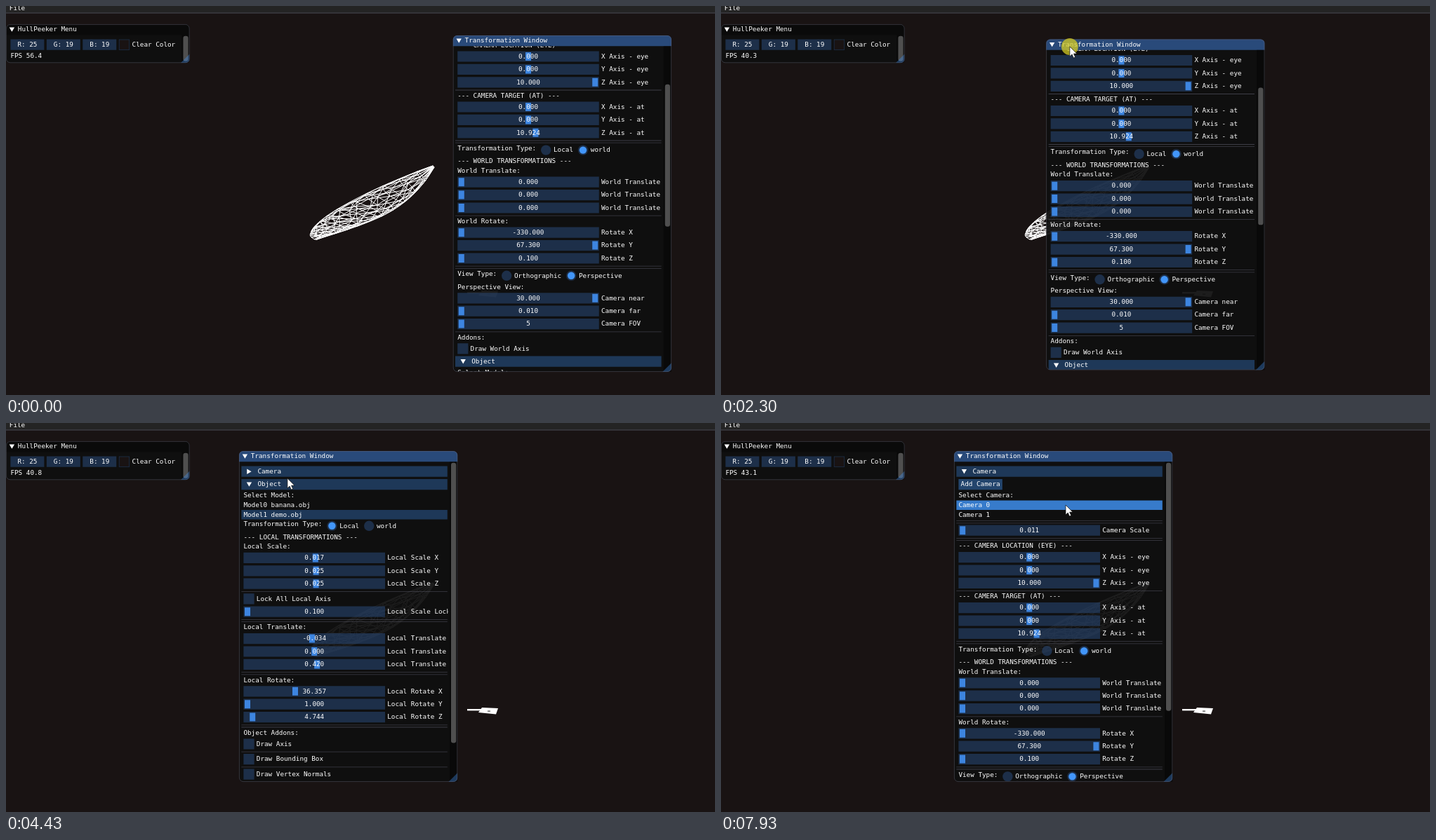
Animation, 1010 px wide and 555 px high, one loop 8000 ms. Source, as an HTML page with a canvas:

```html
<!DOCTYPE html>
<html lang="en">
<head>
<meta charset="utf-8">
<title>Transformation Window</title>
<style>
  html, body { margin: 0; width: 100%; height: 100%; overflow: hidden; background: #191313; }
  canvas { display: block; }
</style>
</head>
<body>
<canvas id="stage" width="1010" height="555"></canvas>
<script>
const ctx = document.getElementById('stage').getContext('2d');
const LOOP = 8000;
const SCALE = 0.8;
const CHAR = 7, FRAME = 19, LINE = 13, GAP = 4, PAD = 8, GRAB = 10;
const WIN_W = 389, SLIDER_W = 252;

const color = {
  frame: 'rgba(41,74,122,.54)',
  frameHover: 'rgba(66,150,250,.4)',
  grab: '#3d85e0',
  accent: '#4296fa',
  header: 'rgba(66,150,250,.31)',
  headerHover: 'rgba(66,150,250,.8)',
  button: 'rgba(66,150,250,.4)',
  line: 'rgba(110,110,128,.5)',
  window: 'rgba(15,15,15,.94)'
};

const RESIZE = [830, 1300], DRAG = [1790, 2560], RELEASE = 3200;
const CAMERA_CLOSE = 4170, OBJECT_CLOSE = 4650, CAMERA_REOPEN = 5980;
const presses = [[880, 1350], [1750, 3150], [4070, CAMERA_CLOSE], [4590, OBJECT_CLOSE],
  [5760, CAMERA_REOPEN]];

// Stops hold a time followed by values.
const mouseStops = [[RELEASE, 379, 51], [3550, 420, 190], [4070, 362, 70], [4220, 362, 70],
  [4430, 401, 79], [4590, 386, 88], [5000, 386, 88], [5300, 402, 158], [5780, 361, 65],
  [6810, 361, 65], [7350, 385, 130], [7930, 491, 117]];
const fpsStops = [[0, 56.4], [920, 47.1], [1950, 41.5], [2770, 38.6], [4430, 40.8],
  [5840, 43.6], [7930, 43.1]];

const mix = (a, b, k) => a + (b - a) * k;
const clamp = k => Math.min(1, Math.max(0, k));
const ramp = (t, [from, to]) => clamp((t - from) / (to - from));
const within = (t, [from, to]) => t >= from && t < to;

function sample(stops, t) {
  const last = stops.length - 1;
  const i = Math.max(0, stops.findLastIndex(stop => stop[0] <= t));
  const a = stops[i], b = stops[Math.min(i + 1, last)];
  const k = i < last ? ramp(t, [a[0], b[0]]) : 0;
  return a.slice(1).map((v, n) => mix(v, b[n + 1], k));
}

function windowRect(t) {
  const resize = ramp(t, RESIZE), drag = ramp(t, DRAG);
  const x = mix(636.8, 341, drag ** 1.3) - 9 * ramp(t, [2770, 3000]);
  const y = 42 + 8.4 * resize - 10 * drag ** 3 - 0.4 * ramp(t, [2770, 3000]);
  return { x, y, h: (480 - 8 * resize) / SCALE };
}

function mouseAt(t) {
  if (t >= RELEASE) return sample(mouseStops, t);
  // The window trails the pointer slightly while it is dragged.
  const { x, y } = windowRect(t + 30);
  const lift = ramp(t, [70, 700]), shift = ramp(t, [1350, 1600]);
  return [x + mix(mix(68, 35, lift), 47, shift), y + mix(mix(330, 4, lift), 11, shift)];
}

function box(x, y, w, h, fill, radius = 0) {
  ctx.fillStyle = fill;
  ctx.beginPath();
  ctx.roundRect(x, y, w, h, radius);
  ctx.fill();
}

function polygon(points, fill) {
  ctx.fillStyle = fill;
  ctx.beginPath();
  points.forEach(([x, y]) => ctx.lineTo(x, y));
  ctx.closePath();
  ctx.fill();
}

function disc(x, y, r, fill) {
  ctx.fillStyle = fill;
  ctx.beginPath();
  ctx.arc(x, y, r, 0, Math.PI * 2);
  ctx.fill();
}

function label(str, x, y) {
  ctx.font = '11.63px "DejaVu Sans Mono", monospace';
  ctx.fillStyle = '#fff';
  ctx.fillText(str, x, y + 10);
}

const centered = (str, cx, y) => label(str, cx - str.length * CHAR / 2, y);

function arrow(x, y, open) {
  const a = 4.6, b = 4;
  polygon(open ? [[x - a, y - b], [x + a, y - b], [x, y + b]]
               : [[x - b, y - a], [x + b, y], [x - b, y + a]], '#fff');
}

function panel(x, y, w, h, title, titleFill, body) {
  ctx.save();
  ctx.translate(x, y);
  ctx.scale(SCALE, SCALE);
  box(0, 0, w, h, color.window, 7);
  box(0, 0, w, FRAME, titleFill, [7, 7, 0, 0]);
  arrow(10.5, 9.5, true);
  label(title, 21, 3);
  body();
  ctx.save();
  ctx.beginPath();
  ctx.roundRect(0, 0, w, h, 7);
  ctx.clip();
  polygon([[w, h - 16], [w, h], [w - 16, h]], 'rgba(66,150,250,.35)');
  ctx.restore();
  ctx.strokeStyle = color.line;
  ctx.lineWidth = 1;
  ctx.beginPath();
  ctx.roundRect(0.5, 0.5, w - 1, h - 1, 7);
  ctx.stroke();
  ctx.restore();
}

// Minimal immediate-mode layout, in unscaled window units.
class Layout {
  constructor(y, right, mouse) {
    Object.assign(this, { y, right, mouse });
  }
  fill(x, y, w, h, normal, hover) {
    const m = this.mouse;
    const hot = m && m.x >= x && m.x < x + w && m.y >= y && m.y < y + h;
    box(x, y, w, h, hot ? hover : normal);
  }
  advance(h) { this.y += h + GAP; }
  text(str) {
    label(str, PAD, this.y);
    this.advance(LINE);
  }
  rule(count = 1) {
    for (; count > 0; count--) {
      box(4, this.y, this.right - 4, 1, color.line);
      this.advance(0);
    }
  }
  header(str, open) {
    this.fill(4, this.y, this.right - 4, FRAME, color.header, color.headerHover);
    arrow(18, this.y + 9.5, open);
    label(str, 33, this.y + 3);
    this.advance(FRAME);
  }
  button(str) {
    this.fill(PAD, this.y, str.length * CHAR + 8, FRAME, color.button, color.accent);
    label(str, PAD + 4, this.y + 3);
    this.advance(FRAME);
  }
  option(str, selected) {
    this.fill(4, this.y - 2, this.right - 4, LINE + GAP,
      selected ? color.header : 'transparent', color.headerHover);
    this.text(str);
  }
  slider(str, value, min, max, digits = 3) {
    const y = this.y;
    const part = ramp(value, [min, max]);
    this.fill(PAD, y, SLIDER_W, FRAME, color.frame, color.frameHover);
    box(PAD + 2 + part * (SLIDER_W - GRAB - 4), y + 2, GRAB, FRAME - 4, color.grab);
    centered(value.toFixed(digits), PAD + SLIDER_W / 2, y + 3);
    label(str, PAD + SLIDER_W + GAP, y + 3);
    this.advance(FRAME);
  }
  sliders(pattern, values, min, max) {
    values.forEach((value, i) => this.slider(pattern.replace('*', 'XYZ'[i]), value, min, max));
  }
  check(str) {
    this.fill(PAD, this.y, FRAME, FRAME, color.frame, color.frameHover);
    label(str, PAD + FRAME + GAP, this.y + 3);
    this.advance(FRAME);
  }
  radios(str, names, active) {
    label(str, PAD, this.y);
    let x = PAD + str.length * CHAR + PAD;
    names.forEach((name, i) => {
      disc(x + 9.5, this.y + 9.5, 9, color.frame);
      if (i === active) disc(x + 9.5, this.y + 9.5, 6.5, color.accent);
      label(name, x + FRAME + GAP, this.y + 3);
      x += FRAME + GAP + name.length * CHAR + PAD;
    });
    this.advance(FRAME);
  }
}

function cameraSection(ui) {
  ui.button('Add Camera');
  ui.text('Select Camera:');
  ui.option('Camera 0');
  ui.option('Camera 1');
  ui.rule(2);
  ui.slider('Camera Scale', 0.011, 0.01, 1);
  ui.rule(2);
  ui.text('--- CAMERA LOCATION (EYE) ---');
  ui.sliders('* Axis - eye', [0, 0, 10], -10, 10);
  ui.rule();
  ui.text('--- CAMERA TARGET (AT) ---');
  ui.sliders('* Axis - at', [0, 0, 10.924], -100, 100);
  ui.rule(2);
  ui.radios('Transformation Type:', ['Local', 'world'], 1);
  ui.text('--- WORLD TRANSFORMATIONS ---');
  ui.text('World Translate:');
  ui.sliders('World Translate *', [0, 0, 0], 0, 1);
  ui.rule();
  ui.text('World Rotate:');
  ui.sliders('Rotate *', [-330, 67.3, 0.1], 1, 10);
  ui.rule(2);
  ui.radios('View Type:', ['Orthographic', 'Perspective'], 1);
  ui.text('Perspective View:');
  ui.slider('Camera near', 30, 0, 30);
  ui.slider('Camera far', 0.01, 0.01, 30);
  ui.slider('Camera FOV', 5, 5, 90, 0);
  ui.rule();
  ui.text('Addons:');
  ui.check('Draw World Axis');
}

function objectSection(ui) {
  ui.text('Select Model:');
  ui.option('Model0 banana.obj');
  ui.option('Model1 demo.obj', true);
  ui.radios('Transformation Type:', ['Local', 'world'], 0);
  ui.text('--- LOCAL TRANSFORMATIONS ---');
  ui.text('Local Scale:');
  ui.sliders('Local Scale *', [0.017, 0.025, 0.025], -1, 1);
  ui.rule();
  ui.check('Lock All Local Axis');
  ui.slider('Local Scale Lock', 0.1, 0.1, 1);
  ui.rule(2);
  ui.text('Local Translate:');
  ui.slider('Local Translate X', -0.034, -1, 1);
  ui.slider('Local Translate Y', 0, -1, 1);
  ui.slider('Local Translate Z', 0.42, -10, 10);
  ui.rule(2);
  ui.text('Local Rotate:');
  ui.sliders('Local Rotate *', [36.357, 1, 4.744], 1, 100);
  ui.rule(2);
  ui.text('Object Addons:');
  ui.check('Draw Axis');
  ui.rule();
  ui.check('Draw Bounding Box');
  ui.rule();
  ui.check('Draw Vertex Normals');
}

function transformWindow(t, mx, my) {
  const { x, y, h } = windowRect(t);
  const scroll = 152 * (1 - ramp(t, [3480, 3800]));
  const cameraOpen = t < CAMERA_CLOSE || t >= CAMERA_REOPEN;
  const objectOpen = t < OBJECT_CLOSE;
  const content = 58 + (cameraOpen ? 674 : 0) + (objectOpen ? 590 : 0);
  const view = h - FRAME;
  const hasBar = content > view;
  const right = hasBar ? 371 : 385;
  const mouse = t > RELEASE && { x: (mx - x) / SCALE, y: (my - y) / SCALE };

  panel(x, y, WIN_W, h, 'Transformation Window', '#294a7a', () => {
    ctx.save();
    ctx.beginPath();
    ctx.rect(4, FRAME, right - 3, view - 1);
    ctx.clip();
    const ui = new Layout(FRAME + PAD - scroll, right, mouse);
    ui.header('Camera', cameraOpen);
    if (cameraOpen) cameraSection(ui);
    ui.header('Object', objectOpen);
    if (objectOpen) objectSection(ui);
    ctx.restore();
    if (hasBar) {
      const track = view - 4;
      box(375, FRAME, 14, view, 'rgba(5,5,5,.53)');
      box(377.5, FRAME + 2 + scroll / content * track, 9, track * view / content, '#4f4f4f', 4);
    }
  });
  if (within(t, [700, 1350])) box(x + 4, y - 0.4, WIN_W * SCALE - 8, 1.6, '#1a66bf');
}

function menuWindow(t) {
  panel(0, 26, 327, 69, 'HullPeeker Menu', '#0a0a0a', () => {
    ['R: 25', 'G: 19', 'B: 19'].forEach((str, i) => {
      const x = PAD + i * 64.3;
      box(x, 27, 60, FRAME, color.frame);
      centered(str, x + 30, 30);
    });
    box(201, 27, FRAME, FRAME, color.frame);
    box(202, 28, FRAME - 2, FRAME - 2, '#191313');
    label('Clear Color', 224.5, 30);
    label('FPS ' + sample(fpsStops, t)[0].toFixed(1), PAD, 50);
    box(313, FRAME, 13, 49, 'rgba(5,5,5,.53)');
    box(315.5, 21, 9, 45, '#4f4f4f', 4);
  });
}

const RINGS = 11, SIDES = 11;
const upperEdge = [[608, 228], [545, 250], [436, 300], [434, 325]];
const lowerEdge = [[610, 230], [572, 296], [520, 308], [443, 333]];

function bezier(points, u) {
  const v = 1 - u;
  const weights = [v * v * v, 3 * v * v * u, 3 * v * u * u, u * u * u];
  return [0, 1].map(axis => points.reduce((sum, p, i) => sum + p[axis] * weights[i], 0));
}

const jitter = seed => (Math.sin(seed * 127.1) * 43758.5 % 1) * 0.35;

// A tube of rings spanned between two silhouette curves.
function ringPoint(ring, side) {
  const u = mix(ring / RINGS, Math.sin(ring / RINGS * Math.PI / 2), 0.4);
  const [ax, ay] = bezier(upperEdge, u), [bx, by] = bezier(lowerEdge, u);
  const turn = side % SIDES + jitter(ring * SIDES + side % SIDES + 1) + ring * 0.3;
  const angle = turn / SIDES * Math.PI * 2;
  const k = (1 - Math.cos(angle)) / 2;
  const bulge = Math.sin(angle) * clamp(ring / 4) * mix(8, 3, u);
  return [mix(ax, bx, k) + bulge, mix(ay, by, k) - bulge / 2];
}

function models() {
  ctx.strokeStyle = '#fff';
  ctx.lineWidth = 1;
  ctx.beginPath();
  for (let r = 0; r <= RINGS; r++) {
    for (let s = 0; s < SIDES; s++) {
      const ends = [ringPoint(r, s + 1)];
      if (r < RINGS) ends.push(ringPoint(r + 1, s), ringPoint(r + 1, s + 1));
      for (const end of ends) {
        ctx.moveTo(...ringPoint(r, s));
        ctx.lineTo(...end);
      }
    }
  }
  for (const edge of [upperEdge, lowerEdge]) {
    ctx.moveTo(...edge[0]);
    ctx.bezierCurveTo(...edge.slice(1).flat());
  }
  ctx.stroke();
  box(657, 408, 20, 2.4, '#fff');
  polygon([[678, 406], [701, 407], [698, 415.5], [673, 413]], '#fff');
  box(686, 410.5, 4, 1.2, '#444');
}

function pointer(t, x, y) {
  if (t < 70) return;
  if (presses.some(span => within(t, span))) disc(x, y, 12, 'rgba(214,204,36,.75)');
  const resizing = within(t, [600, 1400]);
  const shape = resizing
    ? [[0, -9], [4, -4], [1, -4], [1, 4], [4, 4], [0, 9], [-4, 4], [-1, 4], [-1, -4], [-4, -4]]
    : [[0, 0], [0, 14], [3.2, 11], [5.4, 16], [7.8, 15], [5.6, 10.2], [10, 10]];
  polygon(shape.map(([dx, dy]) => [x + dx, y + dy]), '#fff');
  ctx.strokeStyle = '#111';
  ctx.lineWidth = 0.7;
  ctx.stroke();
}

function draw(t) {
  const [mx, my] = mouseAt(t);
  box(0, 0, 1010, 555, '#191313');
  models();
  box(0, 0, 1010, 10.4, '#242424');
  box(0, 9.6, 1010, 0.8, color.line);
  ctx.save();
  ctx.scale(SCALE, SCALE);
  label('File', 6, -2);
  ctx.restore();
  menuWindow(t);
  transformWindow(t, mx, my);
  pointer(t, mx, my);
}

const start = performance.now();
function tick() {
  draw((performance.now() - start) % LOOP);
  requestAnimationFrame(tick);
}
tick();
</script>
</body>
</html>
```
